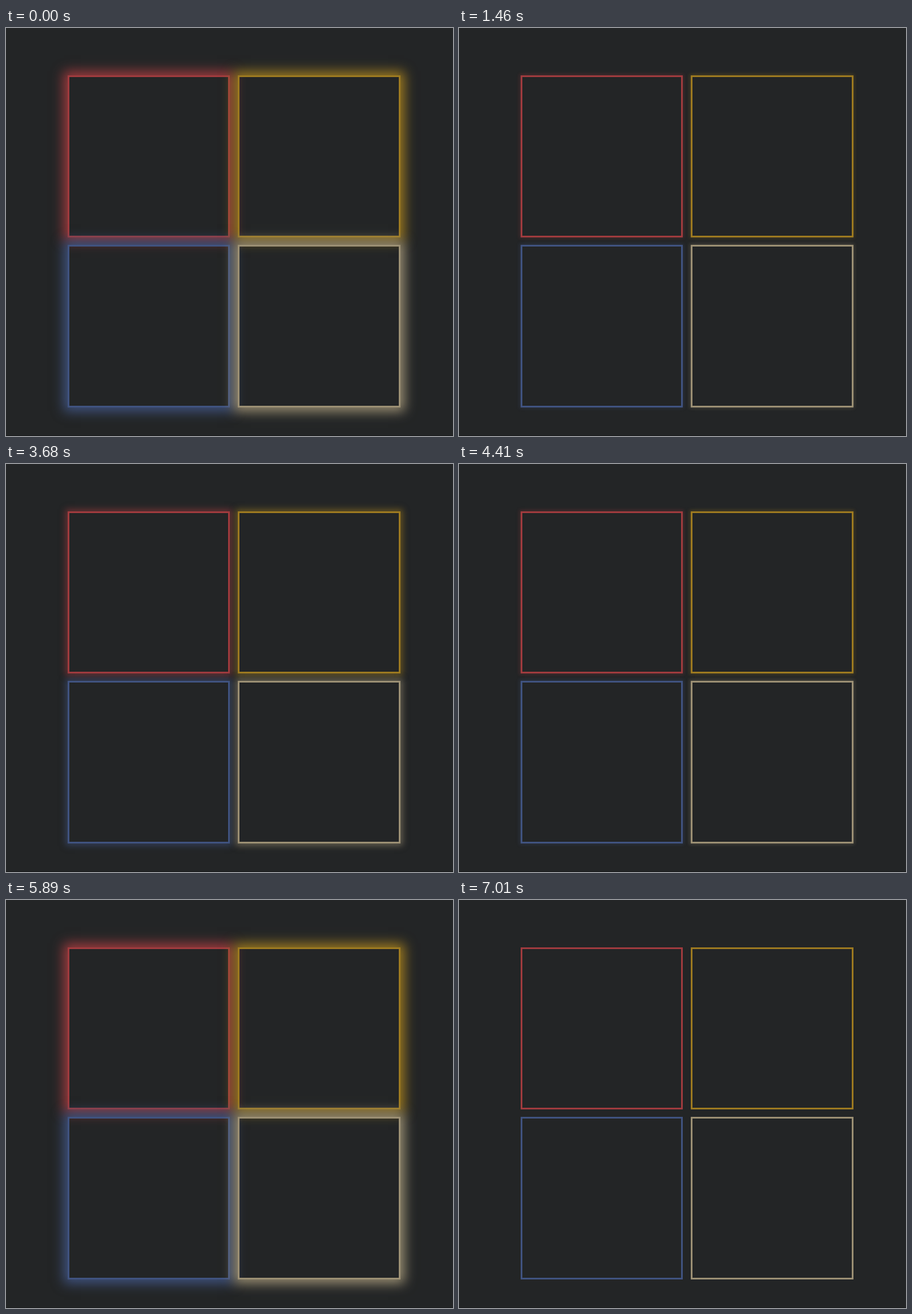
These frames come from a looping animation (783 by 715 pixels, 7.11 s). An HTML page:

```html
<!DOCTYPE html>
<html lang="en">
<head>
<meta charset="utf-8">
<title>Glowing squares</title>
<style>
  html, body { margin: 0; width: 100%; height: 100%; overflow: hidden; background: #232526; }
  #stage { position: relative; width: 783px; height: 715px; overflow: hidden; }
  #stage div { position: absolute; box-sizing: border-box; border: 3px solid; }
  #stage::after { content: ""; position: absolute; left: 0; bottom: 0; width: 100%; height: 1px; background: #191a1b; }
</style>
</head>
<body>
<div id="stage"></div>
<script>
const LOOP = 7110, STEP = 147.3, LAST = 7010;
const PERIOD = 2955, DARK = 1172;   // pulse length, first moment without glow
const BLUR = 20, SPREAD = 7;

const boxes = [
  { x: 108, y: 83, w: 284, h: 284, rgb: "160,59,62" },
  { x: 406, y: 83, w: 285, h: 284, rgb: "157,122,32" },
  { x: 108, y: 380, w: 284, h: 285, rgb: "64,83,128" },
  { x: 406, y: 380, w: 285, h: 285, rgb: "156,144,116" }
];

const stage = document.getElementById("stage");
for (const b of boxes) {
  b.el = stage.appendChild(document.createElement("div"));
  Object.assign(b.el.style, {
    left: b.x + "px", top: b.y + "px",
    width: b.w + "px", height: b.h + "px",
    borderColor: `rgb(${b.rgb})`
  });
}

const bezier = (a, b, s) => 3 * a * s * (1 - s) ** 2 + 3 * b * s * s * (1 - s) + s ** 3;

// cubic-bezier(.25, .1, .25, 1)
function ease(x) {
  let lo = 0, hi = 1;
  for (let i = 0; i < 24; i++) {
    const mid = (lo + hi) / 2;
    if (bezier(0.25, 0.25, mid) < x) lo = mid; else hi = mid;
  }
  return bezier(0.1, 1, lo);
}

// The pulse advances in held steps.
function held(t) {
  if (t >= LAST) return LAST;
  return Math.min(46, Math.floor((t + 14) / STEP)) * STEP;
}

function glow(t) {
  const phase = ((t - DARK) / PERIOD % 1 + 1) % 1;
  return ease(1 - Math.abs(1 - 2 * phase));
}

function draw(t) {
  const p = glow(held(t));
  for (const b of boxes) {
    b.el.style.boxShadow =
      `0 0 ${(BLUR * p).toFixed(2)}px ${(SPREAD * p).toFixed(2)}px rgba(${b.rgb},${p.toFixed(3)})`;
  }
}

const start = performance.now();
function tick() {
  draw((performance.now() - start) % LOOP);
  requestAnimationFrame(tick);
}
tick();
</script>
</body>
</html>
```
